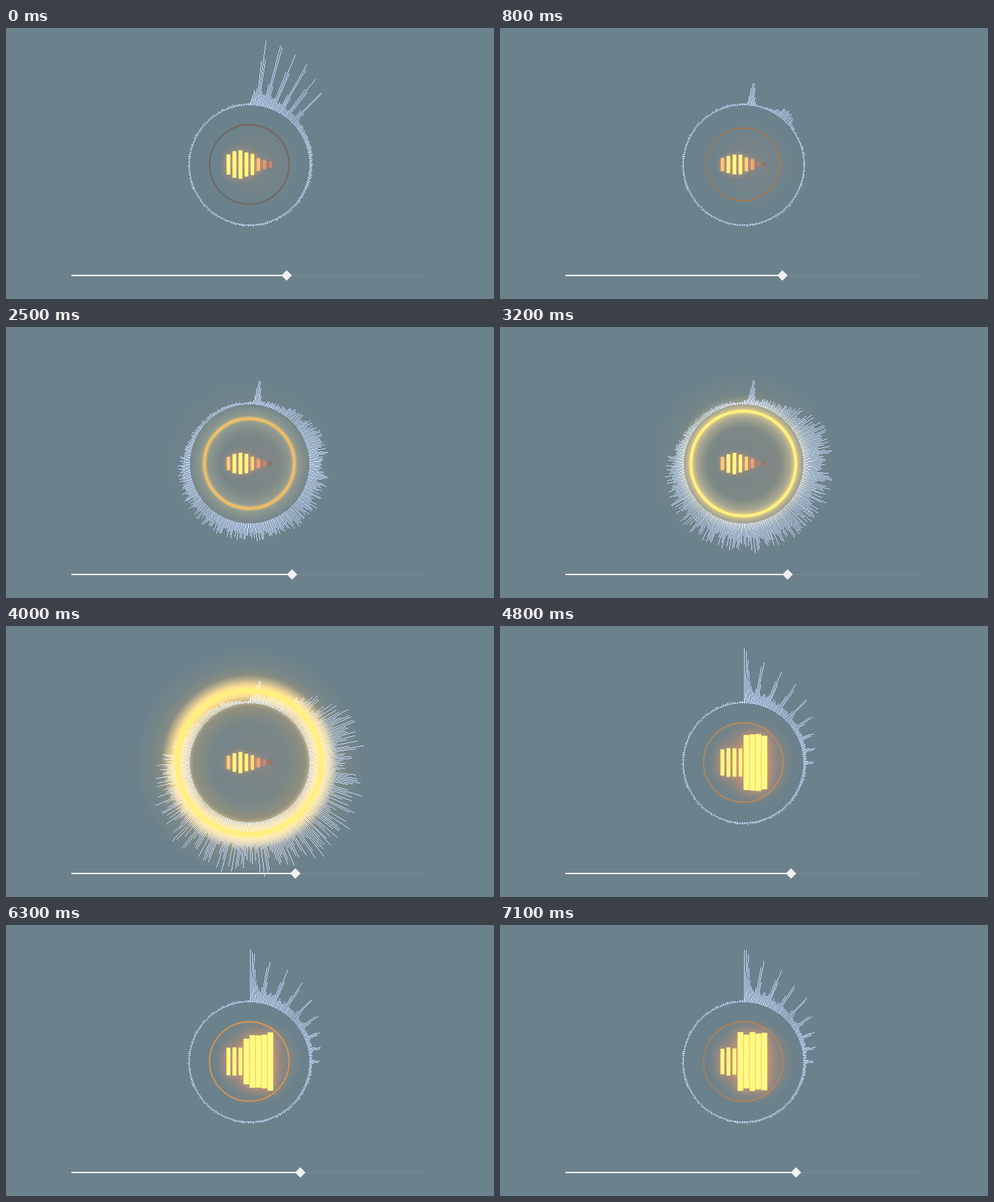
Recreate the animation shown at these times as an HTML page with a canvas. Size 724 by 403 pixels, loop 7.2 s.

```html
<!DOCTYPE html>
<html>
<head>
<meta charset="utf-8">
<style>
  html, body { margin: 0; width: 100%; height: 100%; overflow: hidden; background: #6b828c; }
  canvas { display: block; }
</style>
</head>
<body>
<canvas id="stage" width="724" height="403"></canvas>
<script>
const ctx = document.getElementById('stage').getContext('2d');
const LOOP = 7200, STEP = 100, LINES = 360, CX = 361, CY = 203, RADIUS = 89;

const hash = n => { const s = Math.sin(n * 127.1 + 11.7) * 43758.5453; return s - Math.floor(s); };
const bell = (x, center, width) => Math.exp(-(((x - center) / width) ** 2));

// Piecewise linear curve through [x, y, x, y, ...], flat beyond its ends
function curve(x, ...points) {
  let i = 0;
  while (i < points.length - 4 && x > points[i + 2]) i += 2;
  const [x0, y0, x1, y1] = points.slice(i, i + 4);
  return y0 + (y1 - y0) * Math.min(1, Math.max(0, (x - x0) / (x1 - x0)));
}

// Loudness of each part of the music
const levels = time => ({
  open: curve(time, 0, 1, 800, 0),
  burst: curve(time, 1700, 0, 3200, 0.45, 4000, 1, 4600, 0),
  lead: curve(time, 4000, 0, 4600, 1),
  heat: curve(time, 0, 0, 1700, 0.4, 3200, 1, 4000, 1, 4800, 0.3, 5600, 0.6, 7100, 0.25)
});

// Narrow peaks at the first multiples of a spacing, fading with the angle
function harmonics(deg, spacing, count, height) {
  const n = Math.round(deg / spacing);
  if (n < 1 || n > count) return 0;
  const fall = 1.4 - Math.abs(deg - n * spacing) * 0.7;
  return height * bell(deg, 0, 70) * Math.max(0, Math.min(1, fall));
}

function spikeLength(i, time, { open, burst, lead }) {
  const deg = i + 0.5, grain = hash(i);
  const rim = 0.6 + 2 * hash(i + 500) ** 3;
  const hum = (1 - open) * (1 - lead) * (34 * bell(deg, 7, 2.3) + 16 * bell(deg, 40, 9) * (1 - 0.5 * grain));
  const body = Math.max(open, lead) * 28 * Math.exp(-deg / 38) * Math.min(1, deg / 4) * (1 - 0.4 * grain);
  const kick = lead * 76 / (1 + (deg / 4) ** 4);
  const peaks = Math.max(harmonics(deg, 7.5, 6, 92 * open), harmonics(deg, 11.25, 8, 60 * lead));
  const lobe = curve(deg, 0, 0.12, 30, 0.3, 65, 0.95, 120, 1, 225, 0.85, 265, 0.55, 295, 0.2, 360, 0);
  const blast = 86 * burst ** 0.8 * lobe * (1 - 0.6 * grain);
  const flicker = 0.94 + 0.12 * hash(i + time * 0.37);
  return rim + flicker * Math.max(hum, body, kick, peaks, blast);
}

function barHeight(i, time, { open, lead }) {
  const calm = (6 + 28 * bell(i, 2, 2.9)) * (0.88 + 0.35 * open);
  const edge = curve(time, 4800, 4, 7100, 3);
  const loud = 41 + 40 * Math.min(1, Math.max(0, i - edge + 1));
  return (calm + (loud - calm) * lead) * (0.92 + 0.16 * hash(i + time * 0.53));
}

// Radial gradient around (x, y); stops are [radius, alpha]
function glow(x, y, rgb, stops, blend = 'source-over') {
  const outer = stops[stops.length - 1][0];
  const fill = ctx.createRadialGradient(x, y, 0, x, y, outer);
  for (const [r, alpha] of stops) fill.addColorStop(Math.max(0, r / outer), `rgba(${rgb},${alpha})`);
  ctx.save();
  ctx.globalCompositeOperation = blend;
  ctx.fillStyle = fill;
  ctx.fillRect(x - outer, y - outer, 2 * outer, 2 * outer);
  ctx.restore();
}

// Hard-edged one pixel lines, which give the fine curved interference pattern
function drawSpikes(time, level) {
  ctx.fillStyle = '#c6daff';
  for (let i = 0; i < LINES; i++) {
    const angle = (i + 0.5) * 2 * Math.PI / LINES, dx = Math.sin(angle), dy = -Math.cos(angle);
    const end = RADIUS + 1 + spikeLength(i, time, level);
    const step = 1 / Math.max(Math.abs(dx), Math.abs(dy));
    for (let r = RADIUS; r < end; r += step) {
      ctx.fillRect(Math.round(CX + dx * r), Math.round(CY + dy * r), 1, 1);
    }
  }
}

const ringRadius = ({ open, burst, lead }) => 54 + 53 * burst + 5 * Math.max(open, lead * (1 - burst));

function drawHaze(level) {
  const r = ringRadius(level), p = level.burst;
  if (!p) return;
  glow(CX, CY, '190,160,110', [[0, 0], [r - 50, 0.12 * p], [r - 20, 0.5 * p], [r, 0.7 * p],
    [r + 18, 0.42 * p], [r + 36, 0.15 * p], [r + 62, 0]]);
}

function drawRing(level) {
  const r = ringRadius(level), { burst, heat } = level;
  if (burst) {
    glow(CX, CY, '255,190,90', [[r - 24, 0], [r - 12, 0.25 * burst], [r, 0.55 * burst],
      [r + 12, 0.25 * burst], [r + 24, 0]], 'lighter');
  }
  ctx.save();
  ctx.beginPath();
  ctx.arc(CX, CY, r, 0, 2 * Math.PI);
  ctx.lineWidth = 2.3 + 5 * burst;
  ctx.strokeStyle = `rgb(${curve(heat, 0, 113, 0.6, 240, 1, 255)},${curve(heat, 0, 103, 0.6, 164, 1, 240)},${curve(heat, 0, 97, 0.6, 85, 1, 128)})`;
  ctx.shadowColor = '#ffe070';
  ctx.shadowBlur = 14 * burst;
  ctx.stroke();
  ctx.restore();
}

const barColor = h => `rgb(${curve(h, 4, 100, 10, 232, 16, 255)},${curve(h, 4, 96, 10, 130, 16, 176, 26, 250)},${curve(h, 4, 92, 10, 104, 26, 128)})`;

function drawBars(time, level) {
  glow(372, CY, '225,150,105', [[0, 0.2 + 0.3 * level.lead], [26, 0.1 + 0.3 * level.lead], [66, 0]]);
  // All halos first, so that none tints a neighbouring bar
  for (const halo of [true, false]) {
    for (let i = 0; i < 8; i++) {
      const h = barHeight(i, time, level), width = curve(h, 10, 4, 28, 5, 50, 5.5, 66, 8);
      ctx.save();
      ctx.fillStyle = barColor(h);
      if (halo) {
        ctx.shadowColor = '#ffa070';
        ctx.shadowBlur = h > 12 ? Math.min(16, h * 0.35) : 0;
      }
      ctx.fillRect(330 + i * 8.9 - width / 2, CY - h / 2, width, h);
      ctx.restore();
    }
  }
}

function drawSlider(time) {
  const x = 416.4 + time * 0.00321, y = 368;
  ctx.fillStyle = 'rgba(255,255,255,0.08)';
  ctx.fillRect(x, y - 0.5, 625 - x, 1);
  ctx.fillStyle = '#fff';
  ctx.fillRect(97, y - 1, x - 97, 2);
  ctx.save();
  ctx.translate(x, y);
  ctx.rotate(Math.PI / 4);
  ctx.fillStyle = '#f1f1f3';
  ctx.fillRect(-5.5, -5.5, 11, 11);
  ctx.restore();
}

let shown = -1;
function draw(now) {
  requestAnimationFrame(draw);
  const time = Math.floor(now % LOOP / STEP) * STEP;
  if (time === shown) return;
  shown = time;
  const level = levels(time);
  ctx.fillStyle = '#6b828c';
  ctx.fillRect(0, 0, 724, 403);
  drawHaze(level);
  drawSpikes(time, level);
  drawRing(level);
  drawBars(time, level);
  drawSlider(time);
}
requestAnimationFrame(draw);
</script>
</body>
</html>
```
